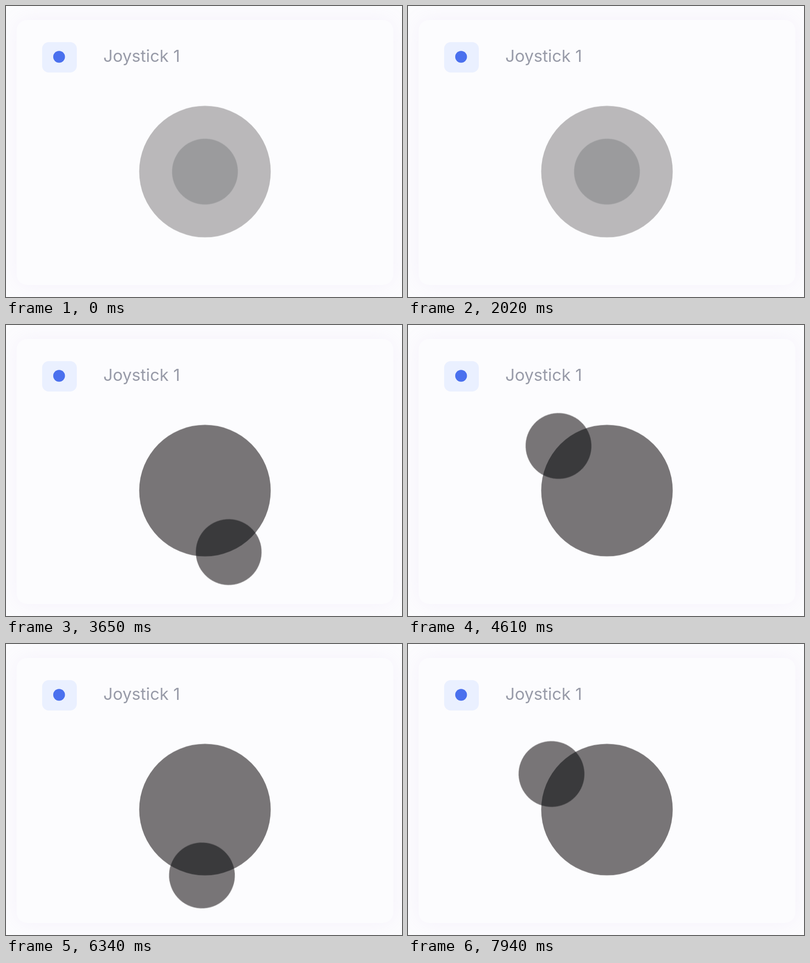
Recreate the animation shown at these times as an HTML page. Size 822 by 604 pixels, loop 8 s.

```html
<!DOCTYPE html>
<html lang="en">
<head>
<meta charset="utf-8">
<title>Joystick</title>
<style>
  html, body { margin: 0; width: 100%; height: 100%; overflow: hidden; background: #fcfcfe; }
  .card {
    position: absolute; left: 22px; top: 29px; width: 782px; height: 550px;
    border-radius: 22px; background: #fcfcfe;
    box-shadow: 0 0 40px rgba(190, 150, 230, .1);
  }
  svg { position: absolute; left: 0; top: 0; display: block; }
  text { font: 400 34.5px Inter, Roboto, sans-serif; fill: #989ba8; }
  .base, .knob { fill: #787577; }
  .overlap { fill: #3a3a3c; }

  .stick, .turn, .push { animation: 8s linear infinite; }
  .stick { animation-name: wake; }
  .turn { animation-name: turn; }
  .push { animation-name: push; }

  @keyframes wake {
    0%, 37.9% { opacity: .5; }
    38.875%, 40.125% { opacity: .765; }
    41.2%, 100% { opacity: 1; }
  }
  @keyframes push {
    0%, 37.9% { transform: translateX(0); }
    38.875%, 40.125% { transform: translateX(21.5px); }
    44.4%, 100% { transform: translateX(136.8px); }
  }
  /* Counterclockwise laps that steadily gain speed. */
  @keyframes turn {
    0% { transform: rotate(-222deg); }
    40.125% { transform: rotate(-222deg); animation-timing-function: cubic-bezier(.333, .22, .667, .6); }
    57.625% { transform: rotate(-497.1deg); animation-timing-function: cubic-bezier(.333, .29, .667, .64); }
    69.375% { transform: rotate(-749.7deg); animation-timing-function: cubic-bezier(.333, .306, .667, .62); }
    86.5% { transform: rotate(-1182.5deg); animation-timing-function: cubic-bezier(.333, .3, .667, .647); }
    99.25%, 100% { transform: rotate(-1587.3deg); }
  }
</style>
</head>
<body>
<div class="card"></div>
<svg width="822" height="604" viewBox="0 0 822 604">
  <defs>
    <clipPath id="inside"><circle r="136.5"/></clipPath>
  </defs>
  <rect x="75" y="75" width="72" height="63" rx="14" fill="#eaf0ff"/>
  <circle cx="110.2" cy="105.5" r="12.2" fill="#4a70ee"/>
  <text x="202" y="116">Joystick 1</text>
  <g transform="translate(413 343.7)">
    <g class="stick">
      <g class="turn"><circle class="knob push" r="68.3"/></g>
      <circle class="base" r="136.5"/>
      <g clip-path="url(#inside)">
        <g class="turn"><circle class="overlap push" r="68.3"/></g>
      </g>
    </g>
  </g>
</svg>
</body>
</html>
```
